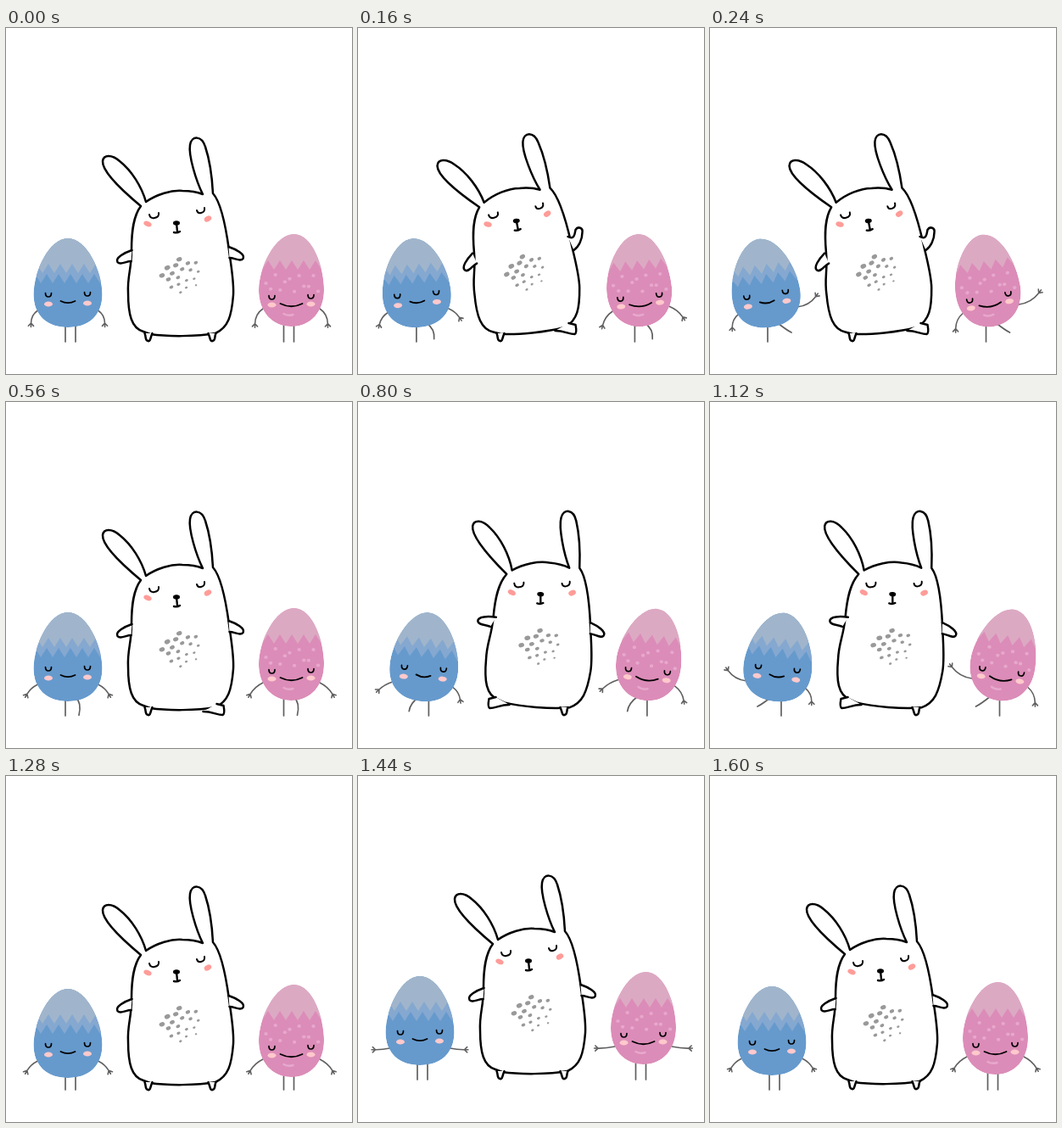
Animation of 408x408 px, one loop 1680 ms. Source, as an HTML page with a canvas:

```html
<!DOCTYPE html>
<html lang="en">
<head>
<meta charset="utf-8">
<title>Dancing bunny</title>
<style>
html, body { margin: 0; width: 100%; height: 100%; overflow: hidden; background: #fff; }
canvas { display: block; }
</style>
</head>
<body>
<canvas id="stage" width="408" height="408"></canvas>
<script>
const ctx = document.getElementById('stage').getContext('2d');
ctx.lineCap = ctx.lineJoin = 'round';
const rad = degrees => degrees * Math.PI / 180;
const SIDES = [-1, 1];

function path(d, stroke, width, fill) {
  const p = new Path2D(d);
  if (fill) { ctx.fillStyle = fill; ctx.fill(p); }
  if (stroke) { ctx.strokeStyle = stroke; ctx.lineWidth = width; ctx.stroke(p); }
}

function oval(x, y, rx, ry, color, tilt = 0) {
  ctx.beginPath();
  ctx.ellipse(x, y, rx, ry, tilt, 0, 7);
  ctx.fillStyle = color;
  ctx.fill();
}

// Draws with the origin at (x, y), turned and optionally mirrored.
function placed(x, y, degrees, draw, side = 1) {
  ctx.save();
  ctx.translate(x, y);
  ctx.rotate(rad(degrees));
  ctx.scale(side, 1);
  draw();
  ctx.restore();
}

// ---- bunny ----
const BODY = 'M159 210C147 200 113 171 114 157C115 149 125 149 134 157C148 168 160 187 165 205' +
  'C178 196 195 191 208 192Q222 192 232 196C224 180 215 150 217 138C219 126 231 127 235 140' +
  'C240 155 243 175 244 195C254 206 260 240 263 262C266 285 269 300 268 315C266 340 262 353 247 360' +
  'C225 364 190 364 170 361L162 358C148 354 144 338 144 312C143 292 148 285 148 262C148 240 150 222 159 210Z';
const ARM = 'M57 259C66 262 77 268 74 273C71 277 64 272 58 272';
const WAVING_ARM = 'M42 246C50 250 50 243 51 238C54 233 60 236 59 241C59 249 55 258 49 262';
const FOOT = 'M33 360C35 364 35 370 38 369C42 369 40 364 42 360';
const KICKING_FOOT = 'M27 357C38 357 43 361 50 361Q53 360 51 350L43 348';

function bunnyFace() {
  path('M169 220Q170 225 175 224Q181 223 180 218M225 215Q226 219 230 218Q235 217 234 212', '#000', 2);
  oval(167, 231, 4.8, 3, '#ff9c98', .35);
  oval(238, 225, 4.5, 3.2, '#ff9c98', -.5);
  oval(201, 230, 4, 2.7, '#000');
  path('M201 230L202 240M198 241Q202 242 205 240', '#000', 2.4);
}

function belly() {
  for (let i = 1; i < 20; i++) {
    const r = 5.6 * Math.sqrt(i), x = r * Math.cos(i * 2.4), y = r * .85 * Math.sin(i * 2.4);
    const size = 2.5 - (x + y) * .04;
    oval(207 + x, 291 + y, size, size * .75, '#999', -.4);
  }
}

function drawBunny(phase, drop) {
  const sway = Math.abs(phase) > .3 ? Math.sign(phase) : 0;
  const outline = d => path(d, '#000', 2.5, '#fff');
  placed(205 + 2 * sway, 365 - 3.5 * Math.abs(sway) + drop, 5.2 * sway, () => {
    ctx.translate(-205, -365);
    outline(BODY);
    bunnyFace();
    belly();
    for (const side of SIDES) {
      if (sway < 0 && side > 0) continue;
      const flap = side < 0 ? -22 * sway : 0;
      placed(205.5, side < 0 ? 3 : -1, 0, () => {
        ctx.translate(55, 266);
        ctx.rotate(rad(flap));
        ctx.translate(-55, -266);
        outline(ARM);
      }, side);
    }
  });
  if (sway < 0) placed(205.5, drop, 0, () => outline(WAVING_ARM));
  for (const side of SIDES) {
    const kicks = phase * side < 0;
    placed(205.5, drop + (kicks && !sway ? 8 : 0), 0, () => outline(kicks ? KICKING_FOOT : FOOT), side);
  }
}

// ---- eggs ----
const EGGS = [
  { x: 73, tip: 0, top: 248, bottom: 353, wide: 314, width: 40.5, turn: 7.2, color: '#669acd',
    bands: [{ x: -39, y: 290, color: '#85a8d0' }, { x: -37, y: 278, color: '#a0b5cb' }],
    eyes: 314, cheeks: 325, mouth: 8.5, smile: 322, shoulder: 333, arm: 17, legs: 76 },
  { x: 336.5, tip: 3, top: 243, bottom: 352, wide: 309, width: 38.5, turn: 9, color: '#dc8cb8', dotted: true,
    bands: [{ x: -27.5, y: 274, color: '#dca9c3' }],
    eyes: 317, cheeks: 326, mouth: 13, smile: 325, shoulder: 331, arm: 20, legs: 333.5 }
];

function shell({ tip, top, bottom, wide, width }) {
  const low = wide + 25;
  return `M${tip} ${top}C${tip + 22} ${top} ${width} ${top + 39} ${width} ${wide}` +
    `C${width} ${low} ${width * .6} ${bottom} 0 ${bottom}` +
    `C${-width * .6} ${bottom} ${-width} ${low} ${-width} ${wide}` +
    `C${-width} ${top + 39} ${tip - 22} ${top} ${tip} ${top}Z`;
}

function zigzag(x, y) {
  let d = 'M-70 200';
  for (let i = -4; i < 15; i++) d += `L${x + i * 7} ${i % 2 ? y + 11 : y}`;
  return d + 'L70 200Z';
}

function drawShell(egg) {
  const outline = shell(egg);
  ctx.save();
  ctx.clip(new Path2D(outline));
  path(outline, null, 0, egg.color);
  for (const band of egg.bands) path(zigzag(band.x, band.y), null, 0, band.color);
  ctx.restore();
  if (egg.dotted) {
    for (let i = 0; i < 12; i++) oval(-30 + i * 5.6, 301 + 10 * Math.sin(i * 2.4), 2.2, 2, '#e7a8cd');
    path('M-9 337Q-4 340 2 338', '#e7a8cd', 2.5);
  }
  for (const side of SIDES) {
    const x = 23 * side, y = egg.eyes - side * .5;
    oval(x, egg.cheeks - side * .5, 5, 3, '#ffc9cc');
    path(`M${x - 3.5} ${y - 2}Q${x - 3.5} ${y + 2.5} ${x} ${y + 2.5}Q${x + 3.5} ${y + 2.5} ${x + 3.5} ${y - 2}`, '#000', 1.7);
  }
  path(`M${-egg.mouth} ${egg.smile}Q0 ${egg.smile + egg.mouth / 2} ${egg.mouth} ${egg.smile}`, '#000', 1.8);
}

// Angles are measured outward from straight down.
function drawArm(x, y, length, angle) {
  const point = (x, y, r, a) => [x + r * Math.sin(a), y + r * Math.cos(a)];
  const hand = point(x, y, length, angle);
  const elbow = point(x, y, length * .55, angle + (1.3 - angle) * .6);
  let d = `M${x} ${y}Q${elbow} ${hand}`;
  const wrist = Math.atan2(hand[0] - elbow[0], hand[1] - elbow[1]);
  for (const spread of [-.75, 0, .75]) d += `M${hand}L${point(...hand, 4.5, wrist + spread)}`;
  path(d, '#606060', 1.6);
}

function drawLeg(kick) {
  const bend = 10 * Math.min(1, kick * 3);
  path(`M6 348Q${6 + bend} ${354 + kick * 2} ${6 + 16 * kick} ${370 - 11 * kick * kick}`, '#606060', 1.7);
}

function drawEgg(egg, phase, drop, armAngle) {
  const lean = Math.abs(phase) > .3 ? phase : 0;
  const turn = egg.turn * lean;
  for (const side of SIDES) {
    placed(egg.legs + 2 * lean, Math.min(drop, 0), 0, () => drawLeg(Math.max(0, -side * phase)), side);
  }
  placed(egg.x + 2 * lean, 352 + drop, turn, () => {
    ctx.translate(0, -352);
    for (const side of SIDES) {
      const raise = -side * lean;
      const wave = Math.max(0, raise) ** 5;
      const angle = armAngle + 72 * wave + 23 * Math.min(0, raise) + side * turn;
      placed(0, 0, 0, () => drawArm(egg.width - 5, egg.shoulder, egg.arm + 7 * wave, rad(angle)), side);
    }
    drawShell(egg);
  });
}

// ---- dance: one phase per beat, -1 is far left and 1 is far right ----
const BEAT = 80, BEATS = 21, CROUCH = 16, LANDING = 20;
const PHASES = [0, -.25, -.55, -1, -1, -1, -1, -.25, 0, 0, .7, 0, -.55, -.25, 1];

function hop(beat) {
  if (beat === CROUCH) return 3;
  return beat > CROUCH && beat < LANDING ? -12 * Math.sin(Math.PI * (beat - CROUCH) / (LANDING - CROUCH)) : 0;
}

function frame(now) {
  const beat = Math.floor(now / BEAT) % BEATS;
  const phase = PHASES[beat] || 0;
  const drop = hop(beat);
  const armAngle = beat === 0 ? 28 : 48 + 3 * Math.max(0, -drop);
  ctx.fillStyle = '#fff';
  ctx.fillRect(0, 0, 408, 408);
  drawBunny(phase, Math.min(drop, 1));
  for (const egg of EGGS) drawEgg(egg, phase, drop, armAngle);
  requestAnimationFrame(frame);
}
frame(0);
</script>
</body>
</html>
```
